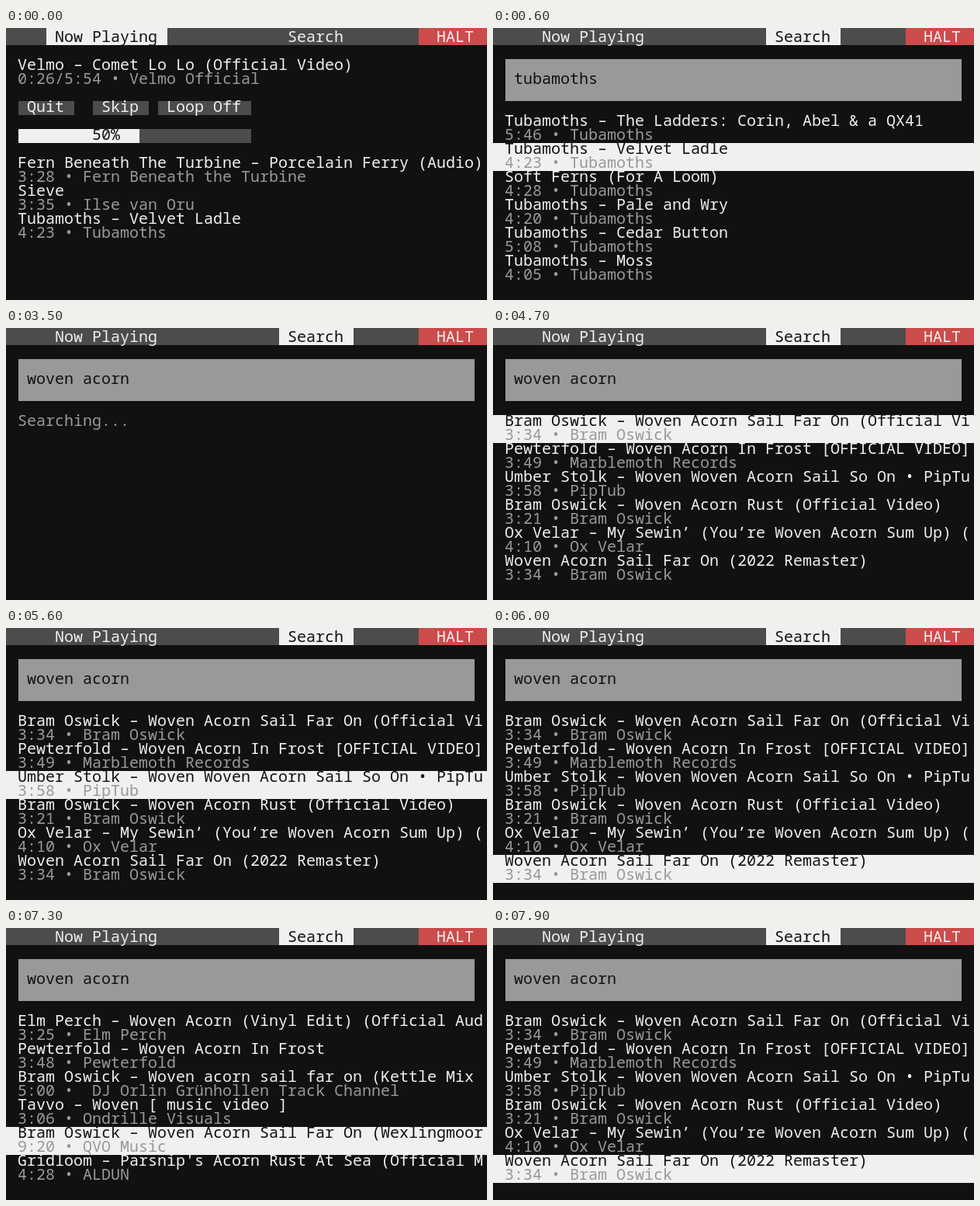
Write an HTML page that moves like this. It is 620 by 350 pixels and loops after 8000 ms.

```html
<!DOCTYPE html>
<html lang="en">
<head>
<meta charset="utf-8">
<title>Music player terminal</title>
<style>
  html, body { margin: 0; width: 100%; height: 100%; overflow: hidden; background: #111; }
  svg { display: block; }
  text { font: 20px "Noto Sans Mono", "DejaVu Sans Mono", monospace; white-space: pre; }
</style>
</head>
<body>
<svg id="screen" width="620" height="350"></svg>
<script>
const LOOP = 8000;
const DARK = '#111', PANEL = '#4c4c4c', GREY = '#999', LIGHT = '#f0f0f0', RED = '#cc4c4c';
const screen = document.getElementById('screen');

// Each item: title, duration, channel
const queue = [
  ['Fern Beneath The Turbine – Porcelain Ferry (Audio)', '3:28', 'Fern Beneath the Turbine'],
  ['Sieve', '3:35', 'Ilse van Oru'],
  ['Tubamoths – Velvet Ladle', '4:23', 'Tubamoths'],
];
const oldResults = [
  ['Tubamoths – The Ladders: Corin, Abel & a QX41', '5:46', 'Tubamoths'],
  ['Tubamoths – Velvet Ladle', '4:23', 'Tubamoths'],
  ['Soft Ferns (For A Loom)', '4:28', 'Tubamoths'],
  ['Tubamoths – Pale and Wry', '4:20', 'Tubamoths'],
  ['Tubamoths – Cedar Button', '5:08', 'Tubamoths'],
  ['Tubamoths – Moss', '4:05', 'Tubamoths'],
];
const pages = [[
  ['Bram Oswick – Woven Acorn Sail Far On (Official Vi', '3:34', 'Bram Oswick'],
  ['Pewterfold – Woven Acorn In Frost [OFFICIAL VIDEO]', '3:49', 'Marblemoth Records'],
  ['Umber Stolk – Woven Woven Acorn Sail So On • PipTu', '3:58', 'PipTub'],
  ['Bram Oswick – Woven Acorn Rust (Official Video)', '3:21', 'Bram Oswick'],
  ['Ox Velar – My Sewin’ (You’re Woven Acorn Sum Up) (', '4:10', 'Ox Velar'],
  ['Woven Acorn Sail Far On (2022 Remaster)', '3:34', 'Bram Oswick'],
], [
  ['Elm Perch – Woven Acorn (Vinyl Edit) (Official Aud', '3:25', 'Elm Perch'],
  ['Pewterfold – Woven Acorn In Frost', '3:48', 'Pewterfold'],
  ['Bram Oswick – Woven acorn sail far on (Kettle Mix ', '5:00', ' DJ Orlin Grünhollen Track Channel'],
  ['Tavvo – Woven [ music video ]', '3:06', 'Ondrille Visuals'],
  ['Bram Oswick – Woven Acorn Sail Far On (Wexlingmoor', '9:20', 'QVO Music'],
  ["Gridloom – Parsnip's Acorn Rust At Sea (Official M", '4:28', 'ALDUN'],
]];

// Selection moves: time, index into all twelve results
const moves = [[4200, -1], [4700, 0], [5400, 1], [5600, 2], [5700, 3], [5900, 4], [6000, 5],
  [6200, 6], [6300, 7], [6500, 8], [6600, 9], [6800, 10], [6900, 11],
  [7300, 10], [7800, 6], [7900, 5]];

const escape = s => s.replace(/&/g, '&amp;').replace(/</g, '&lt;');
const box = (x, y, w, h, fill) => `<rect x="${x}" y="${y}" width="${w}" height="${h}" fill="${fill}"/>`;
const text = (x, y, s, fill) => `<text x="${x - 1}" y="${y + 14}" fill="${fill}">${escape(s)}</text>`;
const button = (x, y, w, label, fill, ink, pad = 12) =>
  box(x, y, w, 18, fill) + text(x + pad, y, label, ink);

function header(searching) {
  const tab = (x, w, label, active) =>
    box(x, 0, w, 22, active ? LIGHT : PANEL) + text(x + 12, 4, label, active ? DARK : LIGHT);
  return box(0, 0, 620, 22, PANEL) + tab(52, 156, 'Now Playing', !searching) +
    tab(352, 96, 'Search', searching) + box(532, 0, 88, 22, RED) + text(556, 4, 'HALT', LIGHT);
}

function list(items, top, selected = -1) {
  return items.map(([title, length, channel], i) => {
    const y = top + i * 36, on = i === selected;
    return (on ? box(0, y, 620, 36, LIGHT) : '') +
      text(16, y, title, on ? DARK : LIGHT) + text(16, y + 18, `${length} • ${channel}`, GREY);
  }).join('');
}

function nowPlaying(t) {
  return header(false) +
    text(16, 40, 'Velmo – Comet Lo Lo (Official Video)', LIGHT) +
    text(16, 58, `0:${t < 300 ? 26 : 27}/5:54 • Velmo Official`, GREY) +
    button(16, 94, 72, 'Quit', PANEL, LIGHT) +
    button(112, 94, 72, 'Skip', PANEL, LIGHT) +
    button(196, 94, 120, 'Loop Off', PANEL, LIGHT) +
    box(16, 130, 300, 18, PANEL) + button(16, 130, 156, '50%', LIGHT, DARK, 96) +
    list(queue, 166);
}

function query(t) {
  if (t < 1400) return 'tubamoths';
  const typed = t < 2600 ? Math.min(5, Math.floor((t - 1900) / 100)) : Math.floor((t - 2100) / 100);
  const cursor = t >= 1800 && t < 2600 ? '_' : '';
  return 'woven acorn'.slice(0, Math.max(0, typed)) + cursor;
}

function results(t) {
  if (t < 3500) return list(oldResults, 112, 1);
  if (t < 4100) return text(16, 112, 'Searching...', GREY);
  if (t < 4200) return list(pages[0].slice(0, 3), 112);
  const index = moves.filter(m => m[0] <= t).pop()[1];
  const page = index > 5 ? 1 : 0;
  return list(pages[page], 112, index - page * 6);
}

function search(t) {
  const focused = t >= 1400 && t < 3400;
  return header(true) + box(16, 40, 588, 54, focused ? LIGHT : GREY) +
    text(28, 58, query(t), DARK) + results(t);
}

let shown = '';
function draw(now) {
  const t = now % LOOP;
  const view = t < 600 ? nowPlaying(t) : search(t);
  if (view !== shown) screen.innerHTML = shown = view;
  requestAnimationFrame(draw);
}
draw(performance.now());
</script>
</body>
</html>
```
